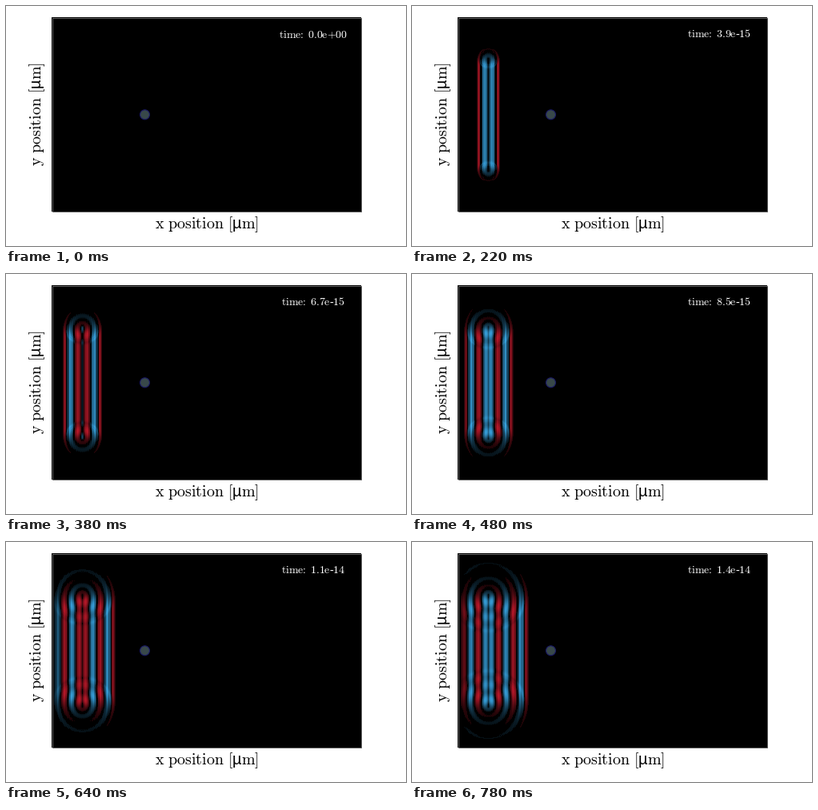
These frames come from a looping animation (500 by 300 pixels, 800 ms). A matplotlib script:

```python
import numpy as np
import matplotlib.pyplot as plt
from matplotlib.animation import FuncAnimation
from matplotlib.patches import Circle, Rectangle

W, H, DPI = 500, 300, 100
FRAMES, INTERVAL = 40, 20
LEFT, RIGHT, TOP, BOTTOM = 57, 444, 14, 257

# Wave simulation, one grid cell per pixel
SUBSTEPS, COURANT = 2, 0.64
WAVELENGTH = 18.4
SOURCE_X = 38
SOURCE_Y = slice(51, 193)
SPONGE = 20
TIME_STEP = 3.54e-16

BLUE = np.array([56, 162, 222]) / 255
RED = np.array([186, 25, 42]) / 255

plt.rcParams["mathtext.fontset"] = "cm"


def simulate():
    """Return the field of a cosine line source for every frame."""
    ny, nx = BOTTOM - TOP, RIGHT - LEFT
    e = np.zeros((ny, nx))
    hx = np.zeros((ny - 1, nx))
    hy = np.zeros((ny, nx - 1))

    # absorbing layer along the left side
    depth = np.clip(1 - np.arange(nx) / SPONGE, 0, 1)
    damp = np.exp(-0.15 * depth**2)

    fields = [e.copy()]
    for step in range((FRAMES - 1) * SUBSTEPS):
        hy += COURANT * np.diff(e, axis=1)
        hx -= COURANT * np.diff(e, axis=0)
        hy *= damp[:-1]
        hx *= damp
        curl = np.diff(hy, axis=1)[1:-1] - np.diff(hx, axis=0)[:, 1:-1]
        e[1:-1, 1:-1] += COURANT * curl
        phase = 2 * np.pi * COURANT * step / WAVELENGTH
        e[SOURCE_Y, SOURCE_X] += 2 * COURANT * np.cos(phase)
        e *= damp
        if step % SUBSTEPS == SUBSTEPS - 1:
            fields.append(e.copy())
    return fields


def strength(u, cutoff):
    level = np.clip(u / 1.25, 0, 1)
    return np.where(u > cutoff, level, 0)[..., None]


def colorize(u):
    return strength(u, 0.18) * RED + strength(-u, 0.115) * BLUE


def time_label(n):
    mantissa, exponent = f"{n * TIME_STEP:.1e}".split("e")
    start = rf"$\text{{time:}}\ \hspace{{0.111}}\text{{{mantissa}e}}$"
    if exponent[0] == "-":
        return start + rf"-$\text{{{exponent[1:]}}}$"
    return start + rf"$\text{{{exponent}}}$"


def axis_label(name):
    return rf"$\text{{{name}}}\ \text{{position}}\ \text{{[}}$µ$\text{{m]}}$"


fields = simulate()

fig = plt.figure(figsize=(W / DPI, H / DPI), dpi=DPI, facecolor="white")
ax = fig.add_axes([0, 0, 1, 1])
ax.axis("off")

image = ax.imshow(colorize(fields[0]), extent=(LEFT, RIGHT, BOTTOM, TOP),
                  interpolation="nearest", aspect="auto")
ax.set_xlim(0, W)
ax.set_ylim(H, 0)

# one-pixel frame just inside the picture's edge
ax.add_patch(Rectangle((LEFT + 0.5, TOP + 0.5),
                       RIGHT - LEFT - 1, BOTTOM - TOP - 1,
                       fill=False, ec="#606060", lw=0.72))
ax.add_patch(Circle((173.5, 135.8), 6, fc="#38484a", ec="#1a1a66", lw=0.8))

label_style = dict(fontsize=14.4, family="Liberation Sans", color="black",
                   ha="center", va="baseline", rotation_mode="anchor")
ax.text(250.7, 278, axis_label("x"), **label_style)
ax.text(44, 135, axis_label("y"), rotation=90, **label_style)
clock = ax.text(384.4, 40, "", fontsize=10, family="Liberation Serif",
                color="white", ha="center", va="baseline")


def update(n):
    image.set_data(colorize(fields[n]))
    clock.set_text(time_label(n))
    clock.set_y(39 if n else 40)
    return image, clock


anim = FuncAnimation(fig, update, frames=FRAMES, interval=INTERVAL,
                     repeat=True, repeat_delay=0)
plt.show()
```
